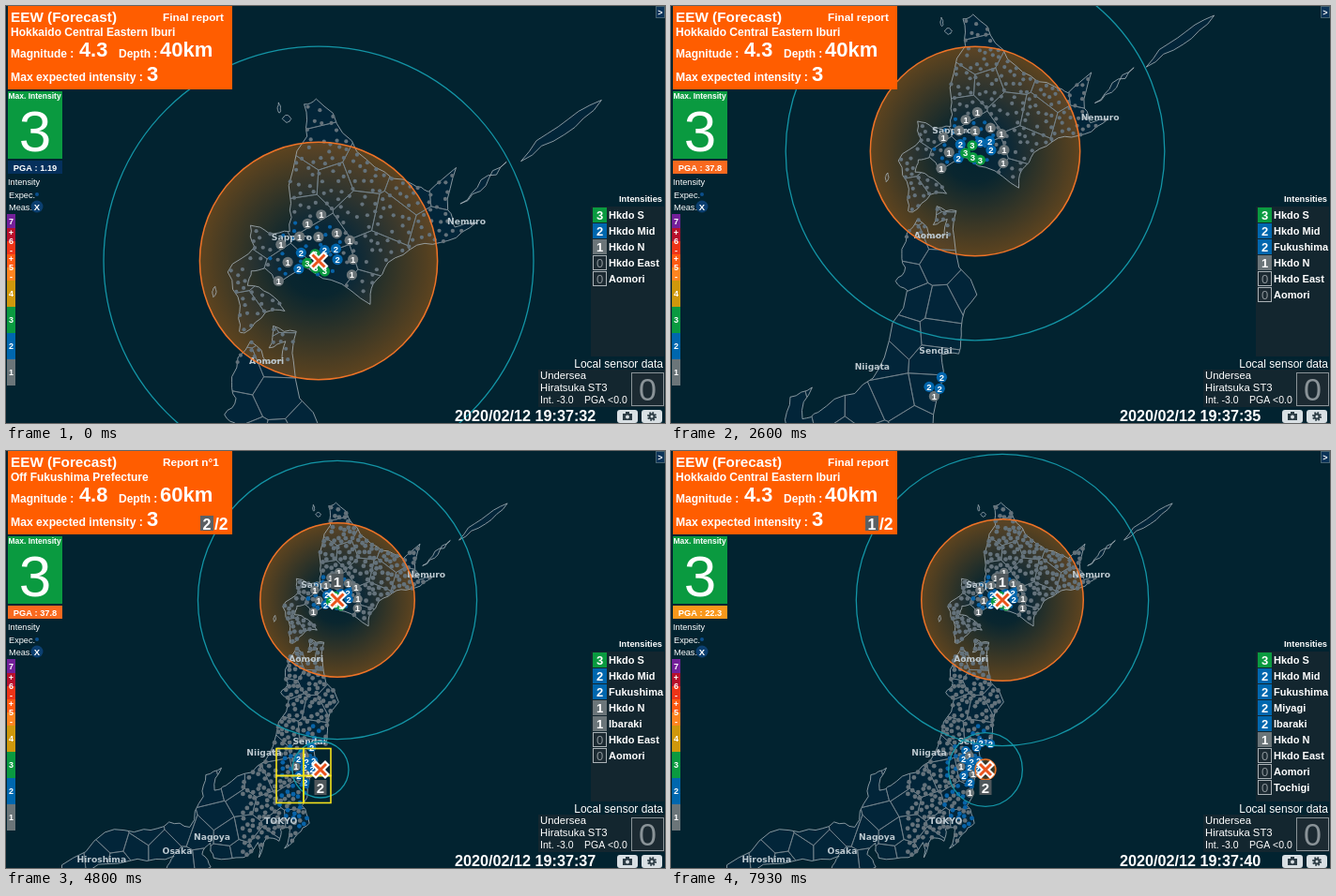
These frames come from a looping animation (702 by 445 pixels, 8000 ms). An HTML page with a canvas:

```html
<!DOCTYPE html>
<html lang="en">
<head>
<meta charset="utf-8">
<title>Earthquake early warning</title>
<style>
html, body { margin: 0; height: 100%; overflow: hidden; background: #022330; }
canvas { display: block; }
</style>
</head>
<body>
<canvas id="stage" width="702" height="445"></canvas>
<script>
const ctx = document.getElementById('stage').getContext('2d');
const SANS = '"Liberation Sans", Arial, sans-serif';
const LEVEL = ['#1c2a32', '#6b7579', '#0067ae', '#0a9a40'];
const PANEL = '#13262f', DIM = '#8a9398', ICON = '#2c3c45';
const TAU = Math.PI * 2;
const ZOOM_OUT = 1.83, NEW_QUAKE = 3.83, BACK_TO_FIRST = 6.3;
const quake2 = { x: -18, y: 181 };

let seed = 7;
const rand = () => (seed = seed * 16807 % 2147483647) / 2147483647;
const dist = (a, b) => Math.hypot(a.x - b.x, a.y - b.y);

// Key points of the coasts as longitude and latitude; rough() adds the detail.
const hokkaido = `141.65 45.43 141.94 45.52 142.58 44.94 143.36 44.35 144.28 44.05 144.66 43.92 145.33 44.34
 145.13 43.6 145.3 43.3 145.82 43.38 145.13 43.06 144.38 42.98 143.68 42.67 143.32 42.29 143.25 41.92 142.3 42.36
 141.6 42.63 140.97 42.3 140.7 42.57 140.37 42.52 140.28 42.26 140.8 42.12 141.18 41.8 140.72 41.78 140.2 41.4
 140.08 41.43 140.1 41.9 139.8 42.5 140.45 42.95 140.35 43.33 140.78 43.2 141.3 43.22 141.33 43.72 141.72 44.88`;
const honshu = `140.9 41.53 141.46 41.43 141.39 40.9 142.05 39.6 141.6 38.85 141.53 38.28 141.03 38.27 141.04 37.5
 140.58 36.3 140.87 35.73 140.4 35.38 139.87 34.9 140.1 35.6 139.7 35.55 139.65 35.14 139.15 35.25 138.84 34.6
 138.8 35.1 138.22 34.6 137.02 34.58 136.88 35.08 136.55 34.7 136.9 34.28 135.77 33.44 135.1 34.2 135.42 34.65
 133.95 34.55 130.9 33.9 130.9 34.35 132.63 35.43 134.2 35.53 135.22 35.77 136.05 35.6 136.6 36.6 136.7 37.3
 137.33 37.52 137.05 36.8 137.5 36.95 138.55 37.38 139.4 38.2 140.05 39.7 139.72 39.9 140 40.2 139.9 40.6
 140.35 41.25 140.75 40.85 141.12 40.9 141.2 41.25 140.8 41.13`;
// Each island runs between two ends and bulges sideways by its width.
const islands = [
  ['145.43 43.71 146.55 44.44', 2.4], ['146.9 44.45 148.85 45.5', 3.2],
  ['141.12 45.18 141.34 45.18', 2.4], ['141.03 45.46 141.05 45.28', 1], ['139.5 42.24 139.45 42.05', 1.3]
];
const cities = [
  ['Sapporo', 141.35, 43.06], ['Nemuro', 145.58, 43.34], ['Aomori', 140.74, 40.82], ['Sendai', 140.87, 38.27],
  ['Niigata', 139.05, 37.91], ['TOKYO', 139.72, 35.69], ['Nagoya', 136.95, 35.18], ['Osaka', 135.55, 34.7],
  ['Hiroshima', 132.5, 34.42]
];

// Mercator offset from the first epicentre, in pixels at zoom 1.
const project = (lon, lat) => ({
  x: (lon - 142) * 26.44,
  y: (0.8257 - Math.atanh(Math.sin(lat * Math.PI / 180))) * 26.44 * 180 / Math.PI
});
const parse = str => str.match(/\S+\s+\S+/g).map(pair => project(...pair.split(/\s+/).map(Number)));

// Midpoint displacement.
function rough(points, amount, depth = 2) {
  if (!depth) return points;
  const finer = points.flatMap((a, i) => {
    const b = points[(i + 1) % points.length], k = (rand() - .5) * amount;
    return [a, { x: (a.x + b.x) / 2 + (b.y - a.y) * k, y: (a.y + b.y) / 2 - (b.x - a.x) * k }];
  });
  return rough(finer, amount, depth - 1);
}
function toPath(points) {
  const path = new Path2D();
  points.forEach(p => path.lineTo(p.x, p.y));
  path.closePath();
  return path;
}
function islandPath([ends, width]) {
  const [a, b] = parse(ends), len = dist(a, b);
  const side = w => ({ x: (a.x + b.x) / 2 + (b.y - a.y) / len * w, y: (a.y + b.y) / 2 - (b.x - a.x) / len * w });
  return toPath(rough([a, side(width), b, side(-width)], .3));
}
const mainland = new Path2D(), land = new Path2D();
for (const coast of [hokkaido, honshu]) mainland.addPath(toPath(rough(parse(coast), .25)));
land.addPath(mainland);
islands.forEach(island => land.addPath(islandPath(island)));

// Random places on the mainland, no two closer than the gap.
function scatter(gap, tries, left) {
  const found = [];
  while (tries--) {
    const p = { x: left + rand() * (101 - left), y: rand() * 401 - 115 };
    if (ctx.isPointInPath(mainland, p.x, p.y) && found.every(q => dist(p, q) > gap)) found.push(p);
  }
  return found;
}

// The region around a centre: all that lies nearer to it than to any other.
function region(c, centres) {
  let cell = [[-90, -90], [90, -90], [90, 90], [-90, 90]].map(([x, y]) => ({ x: c.x + x, y: c.y + y }));
  for (const o of centres) {
    if (o === c) continue;
    const side = p => (p.x - (c.x + o.x) / 2) * (o.x - c.x) + (p.y - (c.y + o.y) / 2) * (o.y - c.y);
    cell = cell.flatMap((a, i) => {
      const b = cell[(i + 1) % cell.length], sa = side(a), sb = side(b), k = sa / (sa - sb);
      const cut = sa * sb < 0 ? [{ x: a.x + (b.x - a.x) * k, y: a.y + (b.y - a.y) * k }] : [];
      return sa <= 0 ? [a, ...cut] : cut;
    });
  }
  return toPath(cell);
}
const regions = scatter(19, 3000, -300).map((c, i, all) => region(c, all));

const stations = scatter(4.2, 6000, -101);
for (const s of stations) {
  const near = dist(s, { x: 0, y: 0 }) < 10 + rand() * 26 ||
    Math.hypot((s.x - quake2.x) * 1.4, s.y - quake2.y - 12) < 22 + rand() * 50;
  s.color = near ? '#0863a8' : '#64727b';
}

// Stations nearest to a quake report first, thinning out with distance.
function reports(quake, count, gap, level, arrival) {
  const chosen = [];
  for (const s of [...stations].sort((a, b) => dist(a, quake) - dist(b, quake)))
    if (chosen.length < count && chosen.every(c => dist(c, s) > gap(dist(s, quake)))) chosen.push(s);
  return chosen.map((s, i) => ({ ...s, level: level(i), start: arrival(i) })).reverse();
}
const readings = [
  ...reports({ x: 0, y: 0 }, 20, d => 4 + d * .18, i => i < 4 ? 3 : i < 9 ? 2 : 1, () => 0),
  ...reports(quake2, 15, () => 6.5, i => i % 4 === 2 ? 1 : 2, i => 1.3 + i * .35)
];

function text(str, x, y, size, { color = '#fff', bold = true, align = 'left', font = SANS } = {}) {
  ctx.font = `${bold ? 'bold ' : ''}${size}px ${font}`;
  ctx.fillStyle = color;
  ctx.textAlign = align;
  ctx.fillText(str, x, y);
}
const mid = { align: 'center' }, right = { align: 'right' }, plain = { bold: false };
function box(x, y, w, h, fill, stroke) {
  ctx.fillStyle = fill;
  ctx.fillRect(x, y, w, h);
  if (!stroke) return;
  ctx.strokeStyle = stroke;
  ctx.lineWidth = 1;
  ctx.strokeRect(x + .5, y + .5, w - 1, h - 1);
}
function disc(x, y, r, fill) {
  ctx.beginPath();
  ctx.arc(x, y, r, 0, TAU);
  ctx.fillStyle = fill;
  ctx.fill();
}
function ring(x, y, r, color, width) {
  ctx.beginPath();
  ctx.arc(x, y, r, 0, TAU);
  ctx.strokeStyle = color;
  ctx.lineWidth = width;
  ctx.stroke();
}
function shakeArea(x, y, r) {
  const g = ctx.createRadialGradient(x, y, 0, x, y, r);
  g.addColorStop(0, 'rgba(255,125,0,0)');
  g.addColorStop(.3, 'rgba(255,125,0,.03)');
  g.addColorStop(1, 'rgba(255,125,0,.36)');
  disc(x, y, r, g);
}
function cross(x, y, r) {
  for (const [color, width, k] of [['#fff', 7, r], ['#ea541c', 3, r - 1.5]]) {
    ctx.strokeStyle = color;
    ctx.lineWidth = width;
    ctx.beginPath();
    for (const d of [-k, k]) {
      ctx.moveTo(x - k, y - d);
      ctx.lineTo(x + k, y + d);
    }
    ctx.stroke();
  }
}
function tag(n, x, y) {
  box(x - 6.5, y - 8, 13, 16, '#50585c');
  text(n, x, y + 5.5, 15, mid);
}

function drawMap(t, blink) {
  const wide = t >= NEW_QUAKE;
  const [vx, vy, s] = wide ? [353, 159, 1] : t >= ZOOM_OUT ? [324, 155, 1.406] : [333, 272, 1.664];
  const at = p => [vx + p.x * s, vy + p.y * s];
  const inMap = paint => {
    ctx.save();
    ctx.translate(vx, vy);
    ctx.scale(s, s);
    ctx.lineWidth = .8 / s;
    ctx.lineJoin = 'round';
    paint();
    ctx.restore();
  };
  const [x2, y2] = at(quake2);
  const r1 = (76.1 + 1.28 * t) * s, r2 = Math.max(0, 6 + (t - 5.47) * 2);

  inMap(() => {
    ctx.fillStyle = '#022539';
    ctx.fill(land);
  });
  shakeArea(vx, vy, r1);
  if (wide) shakeArea(x2, y2, r2);
  inMap(() => {
    ctx.strokeStyle = '#a9b4ba';
    ctx.stroke(land);
    ctx.clip(mainland);
    ctx.strokeStyle = '#77868e';
    regions.forEach(r => ctx.stroke(r));
  });

  for (const p of stations)
    if (wide || p.y < 66) disc(...at(p), wide ? 2.4 : 2.1, p.color);

  for (const [name, lon, lat] of cities) {
    const [x, y] = at(project(lon, lat));
    text(name, x, y - .5, 9.2, { color: '#bcc8cf', align: 'center', font: '"DejaVu Sans", sans-serif' });
  }

  for (const r of readings) {
    if (t < r.start) continue;
    const [x, y] = at(r);
    disc(x, y, wide ? 4.8 : 5.6, LEVEL[r.level]);
    text(r.level, x, y + 3.4, 9.5, mid);
  }

  ring(vx, vy, (137.6 + 2.28 * t) * s, '#1395a6', 1.3);
  ring(vx, vy, r1, '#ee7327', 1.5);
  if (wide) {
    ring(x2, y2, 32 + (t - 5.47) * 3, '#1395a6', 1.3);
    ring(x2, y2, r2, '#ee7327', 1.5);
  }
  if (!blink) return;
  if (t >= 1.3 && t < 5.3) {
    ctx.strokeStyle = '#f5e21c';
    ctx.lineWidth = 1.6;
    for (const x of wide ? [-65, -36] : [-36.5])
      for (const y of [158.5, 187.5]) ctx.strokeRect(...at({ x, y }), 29 * s, 29 * s);
  }
  if (wide) {
    tag(1, vx, vy - 20);
    tag(2, x2, y2 + 19);
    cross(x2, y2, 7.5);
  }
  cross(vx, vy, 8);
}

function drawHeader(t) {
  const both = t >= NEW_QUAKE, second = both && t < BACK_TO_FIRST;
  box(2, 0, 239, 89, '#ff5d00');
  text('EEW (Forecast)', 5, 17, 15.3);
  text(second ? 'Report n°1' : 'Final report', 167, 16, 11.8);
  text(second ? 'Off Fukushima Prefecture' : 'Hokkaido Central Eastern Iburi', 5, 32, 12);
  text('Magnitude :', 5, 55, 12);
  text(second ? '4.8' : '4.3', 78, 54, 21.8);
  text('Depth :', 120, 55, 12);
  text(second ? '60km' : '40km', 164, 54, 22);
  text('Max expected intensity :', 5, 80, 12.2);
  text('3', 150, 80, 22);
  if (!both) return;
  box(207, 69, 14, 16, '#5b6063');
  text(second ? '2' : '1', 214, 84, 16, mid);
  text('/2', 222, 84, 17.5);
}

const SCALE = [
  ['7', '#74209a'], ['+6-', '#b8102c', '#ee3418'], ['+5-', '#ff5a12', '#ff8420'],
  ['4', '#cf980c'], ['3', LEVEL[3]], ['2', LEVEL[2]], ['1', LEVEL[1]]
];
function drawLeft(clock) {
  const pga = clock < 34 ? 1.19 : [27.1, 37.8, 37.8, 37.8, 20.8, 24.1, 22.3][clock - 34];
  box(2, 91, 58, 72, LEVEL[3]);
  text('Max. Intensity', 30.5, 98.5, 8.5, mid);
  text('3', 31, 155, 62, { ...mid, ...plain });
  box(2, 165, 58, 14, pga < 10 ? '#05305c' : pga > 30 ? '#f9691f' : '#f9971b');
  text('PGA : ' + pga, 31, 175.5, 9.3, mid);
  text('Intensity', 2, 191, 9.2, plain);
  text('Expec.', 3, 205, 9.2, plain);
  disc(33, 201, 2, '#0b4f8c');
  text('Meas.', 3, 218, 9.2, plain);
  disc(33, 214, 6.5, '#0b3f70');
  text('X', 33, 217.5, 9.5, mid);
  let y = 222;
  for (const [label, ...colors] of SCALE) {
    const h = label === '7' ? 15 : 28, band = h / colors.length;
    colors.forEach((color, i) => box(1, y + i * band, 9, band, color));
    [...label].forEach((c, i) => text(c, 5.5, y + (i + .5) * h / label.length + 3.3, 9, mid));
    y += h;
  }
}

function drawRight(clock) {
  const rows = [['Hkdo S', 3], ['Hkdo Mid', 2]];
  if (clock >= 34) rows.push(['Fukushima', 2]);
  if (clock >= 38) rows.push(['Miyagi', 2], ['Ibaraki', 2]);
  rows.push(['Hkdo N', 1]);
  if (clock >= 36 && clock < 38) rows.push(['Ibaraki', 1]);
  rows.push(['Hkdo East', 0], ['Aomori', 0]);
  if (clock >= 40) rows.push(['Tochigi', 0]);

  text('Intensities', 699, 209, 9.3, right);
  box(623, 214, 78, 160, PANEL);
  rows.forEach(([name, n], i) => {
    const y = 223 + i * 17;
    box(625, y - 8, 15, 16, LEVEL[n], n ? null : '#aab2b6');
    text(n, 632.5, y + 4.5, 13, { align: 'center', bold: n > 0, color: n ? '#fff' : DIM });
    text(name, 642, y + 4, 11);
  });

  text('Local sensor data', 700, 386, 12, { ...right, ...plain });
  box(567, 388, 135, 40, PANEL);
  text('Undersea', 569, 398, 11.3, plain);
  text('Hiratsuka ST3', 569, 411, 11.3, plain);
  text('Int. -3.0', 569, 424, 10.5, plain);
  text('PGA <0.0', 616, 424, 10.5, plain);
  box(666, 391, 35, 36, LEVEL[0], DIM);
  text('0', 683.5, 421, 34, { ...mid, ...plain, color: DIM });
  text('2020/02/12 19:37:' + clock, 478, 443, 16.2);

  for (const x of [651, 677]) {
    ctx.beginPath();
    ctx.roundRect(x, 431, 22, 14, 3);
    ctx.fillStyle = '#d9e0e4';
    ctx.fill();
  }
  box(657, 435, 10, 7, ICON);
  box(660, 433, 4, 2, ICON);
  disc(662, 438.5, 2, '#d9e0e4');
  ctx.setLineDash([1.6, 1.54]);
  ring(688, 438, 4, ICON, 2);
  ctx.setLineDash([]);
  ring(688, 438, 2.5, ICON, 2);
  box(692, 0, 10, 13, '#0b3358', '#46626f');
  text('>', 697, 10, 9, mid);
}

function draw(now) {
  const t = now / 1000 % 8, beat = 32.7 + t, clock = Math.floor(beat);
  box(0, 0, 702, 445, '#022330');
  drawMap(t, beat % 1 >= .5);
  drawHeader(t);
  drawLeft(clock);
  drawRight(clock);
}

const start = performance.now();
function loop() {
  draw(performance.now() - start);
  requestAnimationFrame(loop);
}
loop();
</script>
</body>
</html>
```
